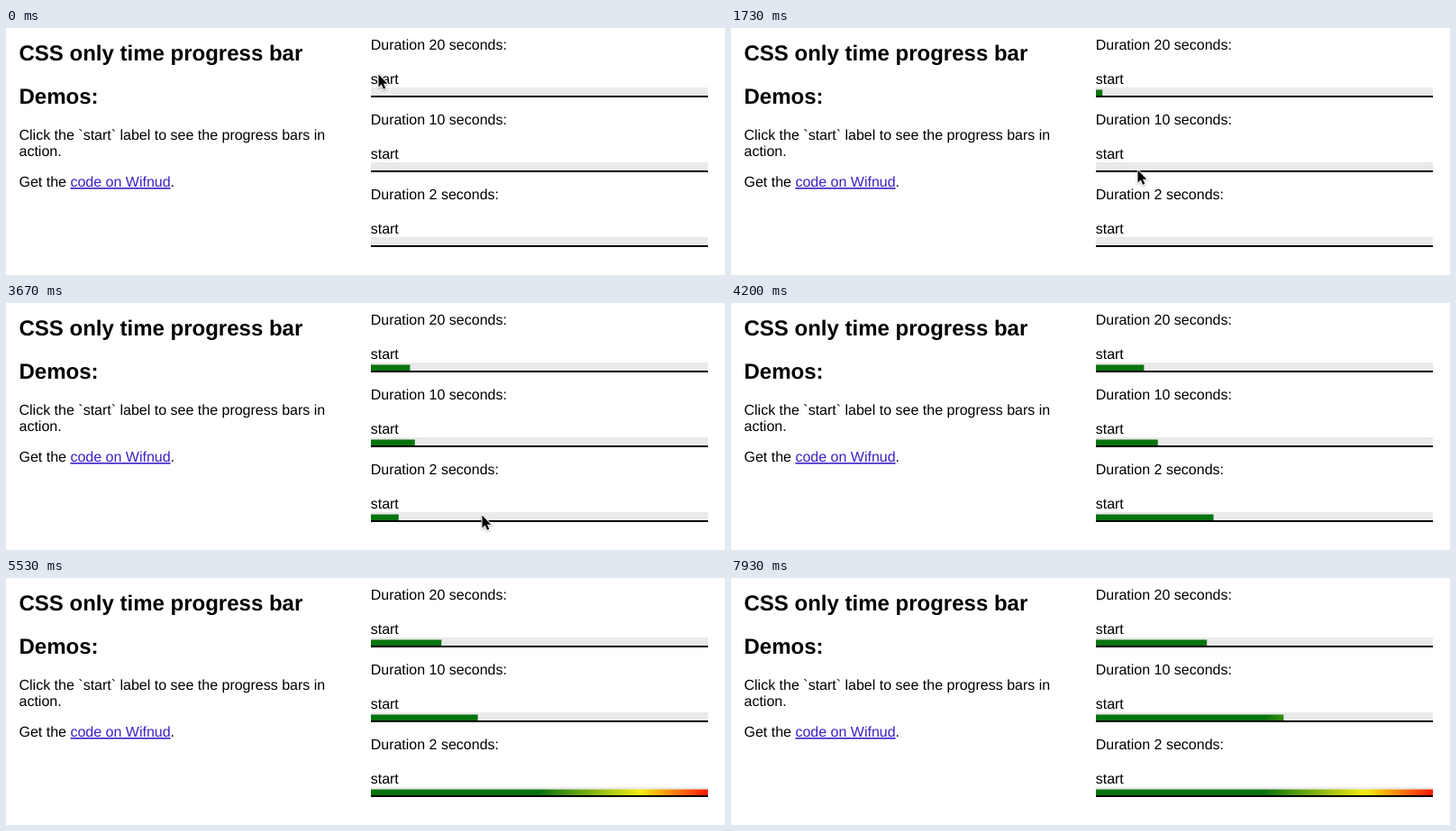
An HTML page for the animation above (8 s loop, 798 px wide and 274 px high).

```html
<!DOCTYPE html>
<html lang="en">
<head>
<meta charset="utf-8">
<title>CSS only time progress bar</title>
<style>
  html, body { margin: 0; width: 100%; height: 100%; overflow: hidden; background: #fff; }
  svg { display: block; width: 798px; height: 274px; }
  text { font: 16px "Liberation Sans", Arial, sans-serif; fill: #000; text-rendering: geometricPrecision; }
  .head { font-size: 24px; font-weight: bold; }
  .link { fill: #3d20c6; text-decoration: underline; }
  #cursor { filter: drop-shadow(0 1px 1px rgba(0, 0, 0, .3)); }
</style>
</head>
<body>
<svg viewBox="0 0 798 274">
  <defs>
    <linearGradient id="heat" gradientUnits="userSpaceOnUse" x1="405" y1="0" x2="779" y2="0">
      <stop offset=".5" stop-color="#08740f"/>
      <stop offset=".8" stop-color="#f4ee12"/>
      <stop offset="1" stop-color="#ff1500"/>
    </linearGradient>
  </defs>
  <text class="head" x="14.5" y="36">CSS only time progress bar</text>
  <text class="head" x="14.5" y="84">Demos:</text>
  <text x="14.5" y="124">Click the `start` label to see the progress bars in</text>
  <text x="14.5" y="142">action.</text>
  <text x="14.5" y="176">Get the <tspan class="link">code on Wifnud</tspan>.</text>
  <g id="bars"></g>
  <path id="cursor" d="M0 0V14L3.2 11L5.6 16.2L7.8 15.2L5.5 10.2H9.8Z"
        stroke="#fff" stroke-width="1.8" paint-order="stroke"/>
</svg>
<script>
const LOOP = 8000, FPS = 15, LEFT = 405, WIDTH = 374, PITCH = 83;

// seconds to fill, start time in ms
const bars = [[20, 1345], [10, 2362], [2, 3502]];

// time, x, y of the pointer tip
const path = [
  [0, 413.5, 51.5], [67, 413.5, 51.5], [130, 414, 52.5], [735, 414, 52.5],
  [1135, 435, 65], [1345, 435, 65], [1733, 451.5, 157.5],
  [2000, 450, 150], [2362, 450, 150], [2600, 467, 204],
  [2800, 497, 249], [3000, 504, 235], [3400, 504, 235],
  [3667, 528.5, 235.5], [3867, 702, 170]
];
const POINTER_END = 3900;

const group = document.getElementById("bars");
const cursor = document.getElementById("cursor");

function add(tag, attrs, text = "") {
  const el = document.createElementNS("http://www.w3.org/2000/svg", tag);
  for (const key in attrs) el.setAttribute(key, attrs[key]);
  el.textContent = text;
  group.append(el);
  return el;
}

const fills = bars.map(([secs], i) => {
  const y = i * PITCH;
  add("text", { x: 404.7, y: y + 24 }, `Duration ${secs} seconds:`);
  add("text", { x: 404.7, y: y + 62 }, "start");
  add("rect", { x: LEFT, y: y + 66, width: WIDTH, height: 9, fill: "#eaeaea" });
  const fill = add("rect", { x: LEFT, y: y + 68.5, width: 0, height: 6.5, fill: "url(#heat)" });
  add("rect", { x: LEFT, y: y + 75, width: WIDTH, height: 2, fill: "#000" });
  return fill;
});

function stepTime(t) {
  let k = Math.floor((t + 4) * FPS / 1000);
  if (Math.round(k * 100 / FPS) * 10 > t) k--;
  return Math.max(0, k) * 1000 / FPS;
}

function pointerAt(t) {
  const i = Math.max(1, path.findIndex(p => p[0] >= t));
  const [t0, x0, y0] = path[i - 1], [t1, x1, y1] = path[i];
  const u = (t - t0) / (t1 - t0), e = u * u * (3 - 2 * u);
  return [x0 + (x1 - x0) * e, y0 + (y1 - y0) * e];
}

function draw(now) {
  const t = stepTime(now % LOOP);
  bars.forEach(([secs, start], i) => {
    const part = Math.min(1, Math.max(0, (t - start) / (secs * 1000)));
    fills[i].setAttribute("width", part * WIDTH);
  });
  const shown = t < POINTER_END;
  cursor.style.display = shown ? "" : "none";
  if (shown) {
    const [x, y] = pointerAt(Math.min(t, path[path.length - 1][0]));
    cursor.setAttribute("transform", `translate(${x} ${y})`);
  }
}

const begin = performance.now();
function tick() {
  draw(performance.now() - begin);
  requestAnimationFrame(tick);
}
tick();
</script>
</body>
</html>
```
